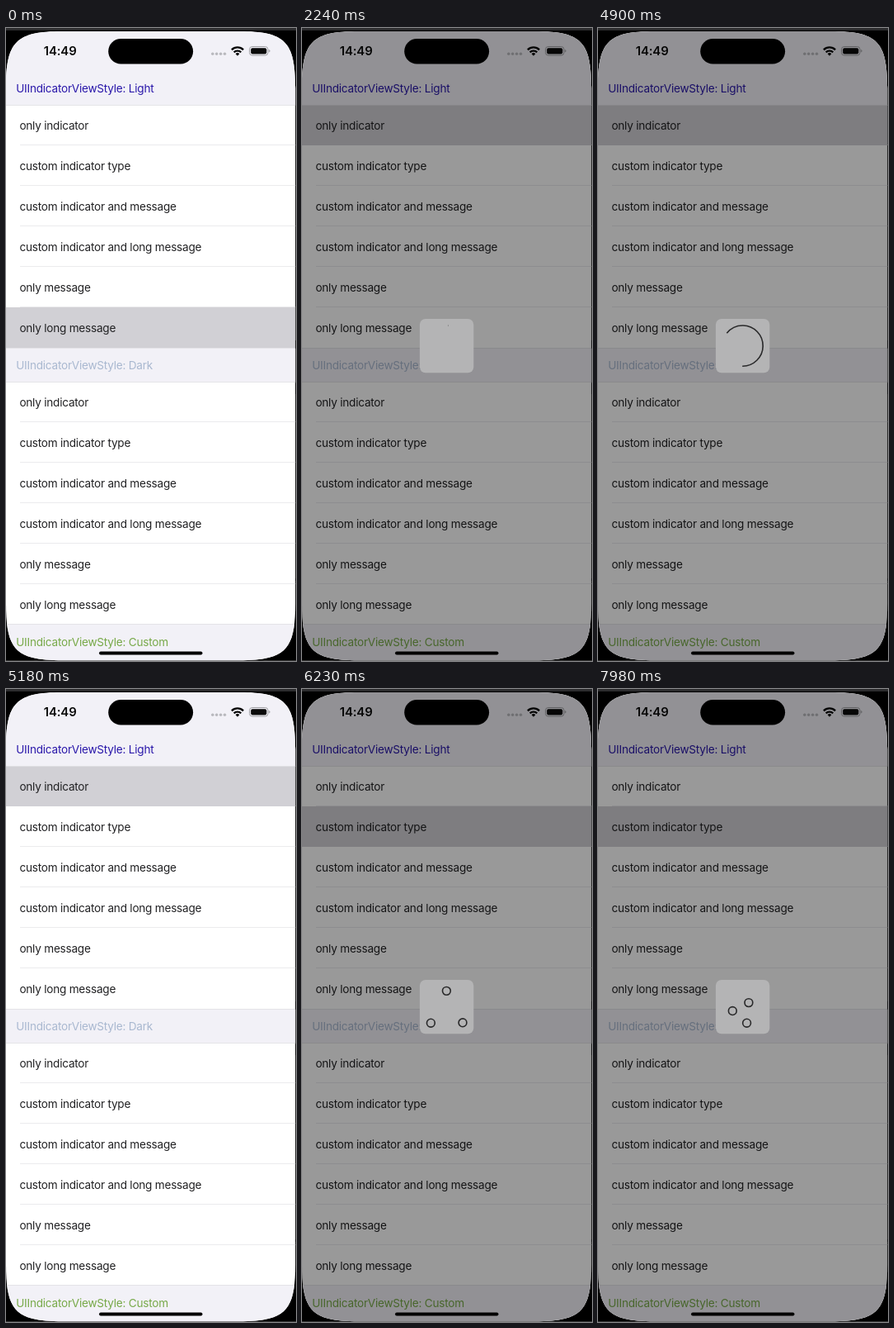
An HTML page for the animation above (8000 ms loop, 352 by 766 pixels).

```html
<!DOCTYPE html>
<html lang="en">
<head>
<meta charset="utf-8">
<title>Indicator styles</title>
<style>
  html, body { margin: 0; width: 100%; height: 100%; overflow: hidden; background: #000; }
  svg { display: block; width: 100%; height: 100%; }
  text { font: 13.6px Inter, "Open Sans", sans-serif; letter-spacing: -.235px; fill: #212123; }
  .clock { font-weight: 600; font-size: 14.9px; letter-spacing: -.1px; fill: #0a0a0a; }
  .mark { fill: none; stroke: #2a2a2b; stroke-width: 1.63; }
</style>
</head>
<body>
<svg viewBox="0 0 352 766">
  <defs>
    <clipPath id="screen"><path id="outline"/></clipPath>
  </defs>
  <rect width="352" height="766"/>
  <rect width="352" height="3" fill="#2c2c2e"/>
  <rect y="765" width="352" height="1" fill="#333"/>
  <g clip-path="url(#screen)">
    <rect width="352" height="766" fill="#fff"/>
    <g id="lines" fill="#ebebed"></g>
    <rect id="selection" width="352" height="49" fill="#d1d0d5"/>
    <g id="headers"></g>
    <g id="labels"></g>

    <text class="clock" x="45.7" y="33.2">14:49</text>
    <g id="signal" fill="#b9b9be"></g>
    <g fill="none" stroke="#0a0a0a" stroke-width="2.3">
      <path d="M273.9 26.4A10 10 0 0 1 288.1 26.4"/>
      <path d="M276.7 29.4A6 6 0 0 1 285.3 29.4"/>
    </g>
    <path d="M278.6 31.3A3.4 3.4 0 0 1 283.4 31.3L281 33.7Z" fill="#0a0a0a"/>
    <rect x="295.5" y="22.5" width="22.5" height="10.6" rx="3.4" fill="none" stroke="#a0a0a4"/>
    <rect x="297.2" y="24.2" width="19.1" height="7.2" rx="2" fill="#0a0a0a"/>
    <path d="M319.2 26v3.6q1.4-.6 1.4-1.8t-1.4-1.8z" fill="#a0a0a4"/>
    <rect x="113" y="754.4" width="125.5" height="4" rx="2"/>

    <g id="overlay">
      <rect width="352" height="766" fill="#000" opacity=".4"/>
      <rect x="142.9" y="351.9" width="65.4" height="65.4" rx="7" fill="#b4b4b5"/>
      <g transform="translate(175.6 384.6)" class="mark">
        <circle id="spinner" r="24.6" pathLength="1"/>
        <g id="balls"></g>
      </g>
    </g>
    <rect x="124.2" y="13" width="102.9" height="30.5" rx="15.25"/>
  </g>
  <path d="M351.6 378v10M351.6 430v13M351.6 666v3" stroke="#1c1c1e" stroke-width=".8"/>
</svg>
<script>
const LOOP = 8000, TICK = 70, RATE = 20 / 21;
const SPIN_AT = 2240, HIDE_AT = 5180, BALLS_AT = 5600;
const ROW = 49, FIRST_ROW = 93;

const $ = id => document.getElementById(id);

function add(parent, tag, attrs, content = '') {
  const el = document.createElementNS('http://www.w3.org/2000/svg', tag);
  for (const key in attrs) el.setAttribute(key, attrs[key]);
  el.textContent = content;
  parent.append(el);
  return el;
}

// Rounded rectangle with continuous corners: reach along the edge, handle distance from the corner.
function smoothRect(x, y, w, h, reach, handle) {
  const r = reach, k = handle, d = r - k;
  return `M${x + r} ${y}h${w - 2 * r}c${d} 0 ${r} ${k} ${r} ${r}` +
    `v${h - 2 * r}c0 ${d} ${-k} ${r} ${-r} ${r}` +
    `h${2 * r - w}c${-d} 0 ${-r} ${-k} ${-r} ${-r}` +
    `v${2 * r - h}c0 ${-d} ${k} ${-r} ${r} ${-r}z`;
}
$('outline').setAttribute('d', smoothRect(0, 4, 351.2, 761.2, 68.7, 12.2));

const rows = ['only indicator', 'custom indicator type', 'custom indicator and message',
  'custom indicator and long message', 'only message', 'only long message'];

for (const top of [FIRST_ROW, 428]) {
  rows.forEach((label, i) => {
    const y = top + i * ROW;
    add($('labels'), 'text', { x: 16.4, y: y + 29.5 }, label);
    if (i) add($('lines'), 'rect', { x: 17, y: y - 1, width: 335, height: 1 });
  });
}

const sections = [
  { name: 'Light', top: 0, bottom: 93, base: 77.7, color: '#2a18aa' },
  { name: 'Dark', top: 387, bottom: 428, base: 412.7, color: '#a9b8d0' },
  { name: 'Custom', top: 721, bottom: 766, base: 747.6, color: '#77a948' }
];
for (const { name, top, bottom, base, color } of sections) {
  add($('headers'), 'rect', { y: top, width: 352, height: bottom - top, fill: '#f2f1f7' });
  for (const y of [top, bottom])
    add($('headers'), 'rect', { y, width: 352, height: 0.9, fill: '#e2e2e6' });
  add($('headers'), 'text', { x: 12.2, y: base, style: `fill:${color}` }, `UIIndicatorViewStyle: ${name}`);
}

for (let i = 0; i < 4; i++) add($('signal'), 'circle', { cx: 250.8 + i * 4.9, cy: 31.3, r: 1.75 });

// Triangle corners in travel order: top, right, left.
const corners = [[0, -19.6], [19.6, 19.6], [-19.6, 19.6]];
const balls = corners.map(() => add($('balls'), 'circle', { r: 4.9 }));

const clamp = x => Math.min(1, Math.max(0, x));

// Cubic easing with control points (x1, 0) and (x2, 1).
function ease(x, x1, x2) {
  x = clamp(x);
  let lo = 0, hi = 1, s = 0.5;
  for (let i = 0; i < 24; i++) {
    s = (lo + hi) / 2;
    const at = 3 * (1 - s) ** 2 * s * x1 + 3 * (1 - s) * s * s * x2 + s ** 3;
    if (at < x) lo = s; else hi = s;
  }
  return 3 * (1 - s) * s * s + s ** 3;
}

function drawSpinner(ms) {
  const t = ms % 1700;
  const end = ease(t / 700, 0.4, 0.2);
  const start = ease((t - 500) / 1200, 0.4, 0.2);
  $('spinner').setAttribute('stroke-dasharray', `${end - start} 2`);
  $('spinner').setAttribute('stroke-dashoffset', -start);
  $('spinner').setAttribute('transform', `rotate(${t / 1700 * 360 - 90})`);
}

function drawBalls(ms) {
  const keys = [0, 0.33, 0.66, 1];
  const p = ms % 2000 / 2000;
  const leg = p < keys[1] ? 0 : p < keys[2] ? 1 : 2;
  const k = ease((p - keys[leg]) / (keys[leg + 1] - keys[leg]), 0.42, 0.58);
  balls.forEach((ball, i) => {
    const a = corners[(i + leg) % 3], b = corners[(i + leg + 1) % 3];
    ball.setAttribute('cx', a[0] + (b[0] - a[0]) * k);
    ball.setAttribute('cy', a[1] + (b[1] - a[1]) * k);
  });
}

function show(id, on) { $(id).style.display = on ? '' : 'none'; }

function draw(now) {
  const t = Math.floor(now % LOOP / TICK) * TICK;
  const spinning = t >= SPIN_AT && t < HIDE_AT;
  const bouncing = t >= BALLS_AT;
  const selected = t < SPIN_AT ? 5 : bouncing ? 1 : 0;
  $('selection').setAttribute('y', FIRST_ROW + selected * ROW);
  show('overlay', spinning || bouncing);
  show('spinner', spinning);
  show('balls', bouncing);
  if (spinning) drawSpinner((t - SPIN_AT) * RATE + 21);
  if (bouncing) drawBalls((t - BALLS_AT) * RATE + 14);
}

const began = performance.now();
function frame() {
  draw(performance.now() - began);
  requestAnimationFrame(frame);
}
frame();
</script>
</body>
</html>
```
